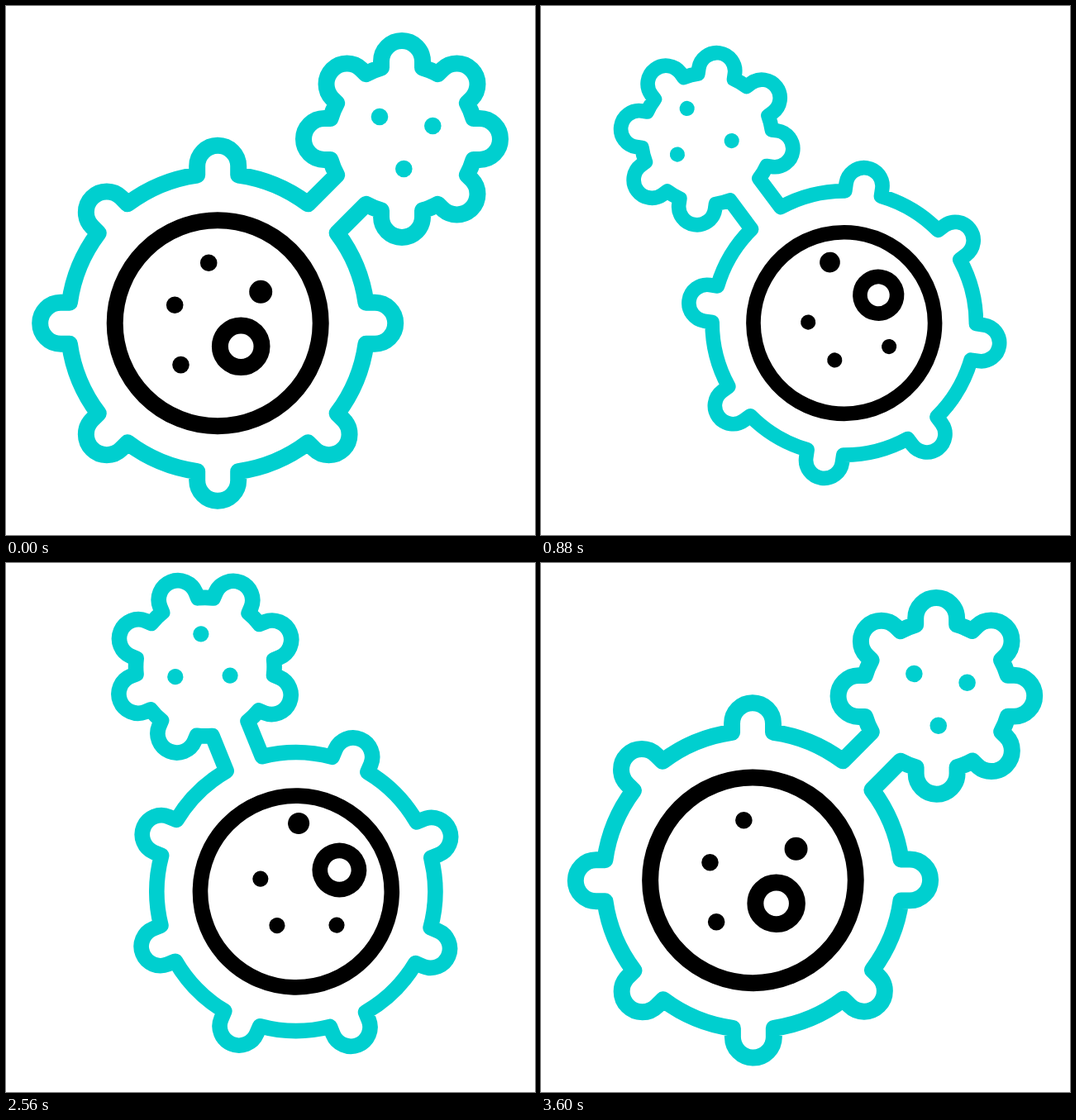
Animation, 640 px wide and 640 px high, one loop 3.64 s. Source, as an HTML page:

```html
<!DOCTYPE html>
<html lang="en">
<head>
<meta charset="utf-8">
<title>Budding cell</title>
<style>
  html, body { margin: 0; height: 100%; overflow: hidden; background: #fff; }
  svg { display: block; width: 100vw; height: 100vh; }
</style>
</head>
<body>
<svg viewBox="0 0 640 640">
  <g id="cell">
    <path id="shell" fill="none" stroke="#00cfcf" stroke-width="20" stroke-linejoin="round"/>
    <circle cx="256.2" cy="383.8" r="124.5" fill="none" stroke="#000" stroke-width="20"/>
  </g>
</svg>
<script>
const LOOP = 3640, STEP = 40, KNOB = 25, PIVOT = '319.4 320.3';
const BIG = [256.2, 383.8], BUD = [479, 161];
const cell = document.getElementById('cell');

// Clockwise rim with seven knobs, left open at angle `start`.
function rim([cx, cy], radius, tip, start) {
  const base = Math.sqrt(radius ** 2 - KNOB ** 2);
  const at = (deg, r, side) => {
    const a = deg * Math.PI / 180, c = Math.cos(a), s = Math.sin(a);
    return `${(cx + r * c - side * s).toFixed(2)} ${(cy + r * s + side * c).toFixed(2)}`;
  };
  const arc = r => `A${r} ${r} 0 0 1 `;
  let d = at(start, base, KNOB);
  for (let k = 1; k < 8; k++) {
    const a = start + k * 45;
    d += arc(radius) + at(a, base, -KNOB) + 'L' + at(a, tip, -KNOB) +
         arc(KNOB) + at(a, tip, KNOB) + 'L' + at(a, base, KNOB);
  }
  return d + arc(radius) + at(start + 360, base, -KNOB);
}
document.getElementById('shell').setAttribute('d',
  `M${rim(BIG, 181, 190, -45)}L${rim(BUD, 90, 94, 135)}Z`);

function addDot([cx, cy], x, y, r, color, ring) {
  const dot = document.createElementNS('http://www.w3.org/2000/svg', 'circle');
  const attrs = { cx: cx + x, cy: cy + y, r, fill: ring ? 'none' : color };
  if (ring) Object.assign(attrs, { stroke: color, 'stroke-width': 20 });
  for (const name in attrs) dot.setAttribute(name, attrs[name]);
  return cell.appendChild(dot);
}

// Smooth curve through [time, value] pairs, flat at the turning points.
function track(...keys) {
  const slope = i => (keys[i + 1][1] - keys[i][1]) / (keys[i + 1][0] - keys[i][0]);
  const tangent = i => {
    if (i === 0 || i === keys.length - 1) return 0;
    const a = slope(i - 1), b = slope(i);
    return a * b > 0 ? 2 * a * b / (a + b) : 0;
  };
  return t => {
    let i = 0;
    while (i < keys.length - 2 && t >= keys[i + 1][0]) i++;
    const [t0, v0] = keys[i], [t1, v1] = keys[i + 1];
    const span = t1 - t0, u = (t - t0) / span, w = 1 - u;
    return v0 * w * w * (1 + 2 * u) + v1 * u * u * (1 + 2 * w) +
           span * u * w * (tangent(i) * w - tangent(i + 1) * u);
  };
}

const turn = track([0, 0], [280, 17], [560, 51], [880, 81.7], [1120, 93.3], [1320, 95],
  [1520, 93.9], [1680, 90.8], [1820, 89.6], [2120, 85.8], [2240, 83.3], [2480, 72],
  [2600, 64], [2800, 43], [2960, 25.3], [3360, 4.6], [LOOP, 0]);
const zoom = track([0, 1], [280, .93], [560, .855], [620, .852], [880, .882], [1120, .923],
  [1520, .982], [1680, .997], [1880, 1], [2120, .998], [2240, .987], [2480, .95],
  [2600, .92], [2800, .862], [2920, .853], [2960, .855], [3360, .955], [LOOP, 1]);
const drop = track([0, 0], [280, .5], [560, 1], [2960, 1], [LOOP, 0]);
const sway = track([0, 0], [500, 0], [560, .06], [880, .99], [980, 1.1], [1520, 0],
  [2120, 1], [2960, 1.11], [LOOP, 1]);

// Each inner dot: element, left reach, sway width, drop height.
const inner = [
  [addDot(BIG, 28, 28, 25.3, '#000', true), -16, 33, 13],
  [addDot(BIG, 52, -38, 14, '#000'), -8, 36, 6.6],
  [addDot(BIG, -11, -73, 10.3, '#000'), -29.2, 34.5, 24],
  [addDot(BIG, -52, -22, 10.3, '#000'), -21, 21, 16.5],
  [addDot(BIG, -44.7, 50.3, 10.3, '#000'), -17, 39, 15.3]
];
const budDot = (x, y, ...keys) =>
  [addDot(BUD, x, y, 10.3, '#00cfcf'), track([0, 0], ...keys, [LOOP, 0])];
const bud = [
  budDot(-27, -27, [560, -19], [880, -10], [1520, -3], [2120, -2], [2960, -5]),
  budDot(37.3, -16, [560, -16], [880, -17], [1520, 2], [2120, -5.5], [2960, -5.6]),
  budDot(2.3, 36, [560, -22], [880, -2], [1520, -8], [2120, 1], [2960, -4])
];

function draw(t) {
  cell.setAttribute('transform',
    `translate(${PIVOT}) rotate(${-turn(t)}) scale(${zoom(t)}) translate(-319.4 -320.3)`);
  const h = drop(t), g = sway(t);
  for (const [dot, left, width, height] of inner)
    dot.setAttribute('transform', `translate(${h * (left + width * g)} ${h * height})`);
  for (const [dot, lift] of bud)
    dot.setAttribute('transform', `translate(0 ${lift(t)})`);
}

function tick() {
  draw(Math.floor(performance.now() % LOOP / STEP) * STEP);
  requestAnimationFrame(tick);
}
tick();
</script>
</body>
</html>
```
